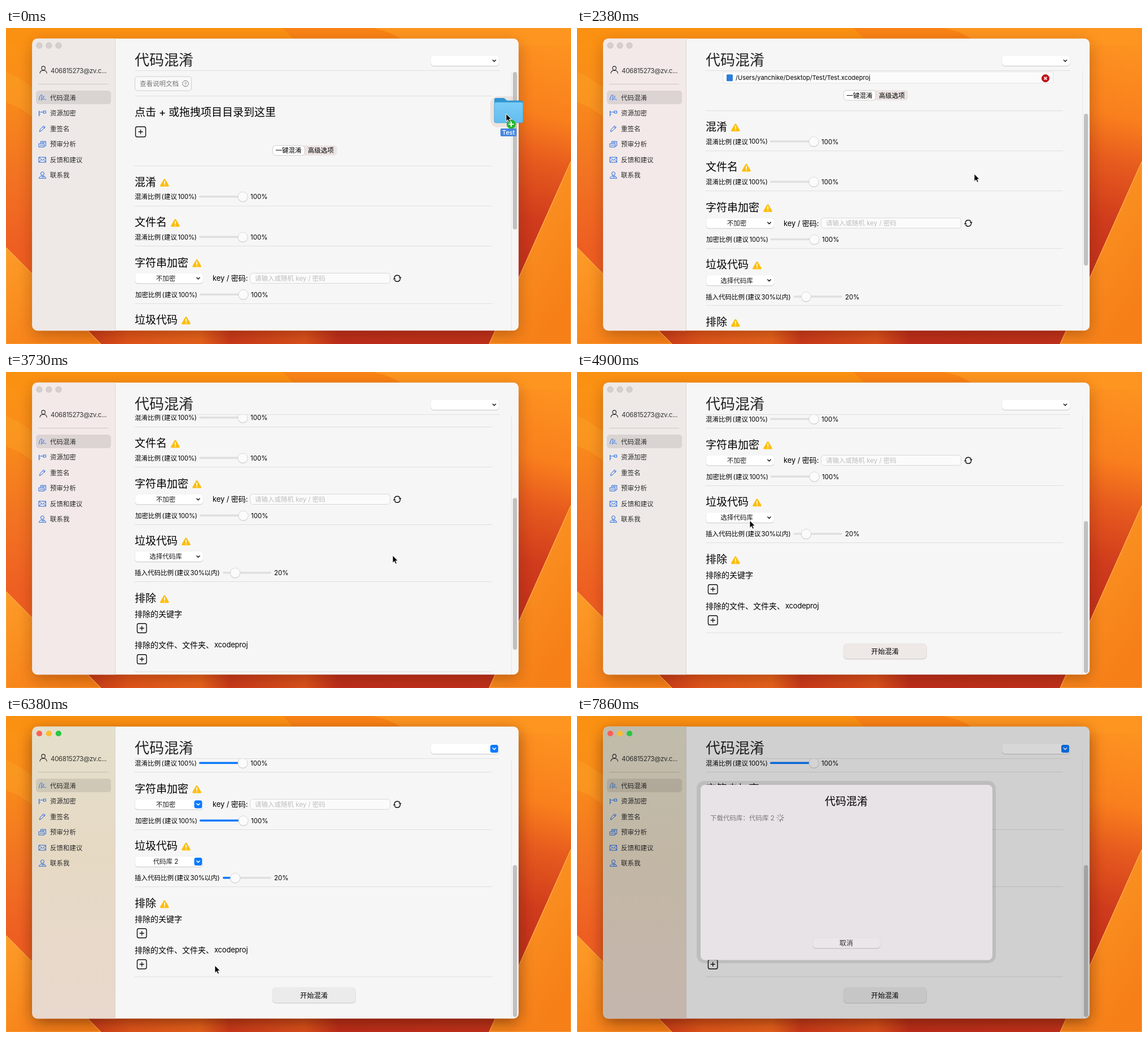
These frames come from a looping animation (1001x560 px, 8 s). An HTML page:

```html
<!DOCTYPE html>
<html lang="zh-CN">
<head>
<meta charset="utf-8">
<style>
html, body { margin: 0; width: 100%; height: 100%; overflow: hidden; background: #f5861c; }
svg { display: block; width: 1001px; height: 560px; }
text { font-family: Inter, "Noto Sans CJK SC", "Noto Sans CJK", sans-serif; white-space: pre; }
.line { stroke: #e0dfdf; }
.icon { fill: none; stroke: #2468e0; stroke-width: 1; stroke-linejoin: round; stroke-linecap: round; }
.accent { display: none; }
.active .accent { display: inline; }
.active .plain { display: none; }
</style>
</head>
<body>
<svg id="stage" viewBox="0 0 1001 560"></svg>
<script>
const stage = document.getElementById('stage');
const BLUE = '#0a7aff';

// ---- drawing helpers ----
const text = (x, cy, size, str, o = '') =>
  `<text x="${x}" y="${cy + size * 0.38}" font-size="${size}" ${o}>${str}</text>`;
const mid = (x, cy, size, str, o = '') => text(x, cy, size, str, 'text-anchor="middle" ' + o);
const rect = (x, y, w, h, r, fill, o = '') =>
  `<rect x="${x}" y="${y}" width="${w}" height="${h}" rx="${r}" fill="${fill}" ${o}/>`;
const path = (d, o) => `<path d="${d}" ${o}/>`;
const line = (y, x1 = 228, x2 = 861) => path(`M${x1} ${y}H${x2}`, 'class="line"');
const group = (id, body, o = '') => `<g id="${id}" ${o}>${body}</g>`;
const chevron = (x, y, color) =>
  path(`M${x - 2.7} ${y - 1.3}l2.7 2.7 2.7 -2.7`, `fill="none" stroke="${color}" stroke-width="1.5" stroke-linecap="round" stroke-linejoin="round"`);

const raised = (x, y, w, h, r, fill, o = '') =>
  rect(x, y + 1, w, h, r, '#000', 'opacity=".16"') + rect(x - .4, y - .3, w + .8, h + .8, r, '#000', 'opacity=".08"') +
  rect(x, y, w, h, r, fill, o);

const popup = (x, cy, label, id = '') =>
  raised(x, cy - 9, 120.5, 18, 5, '#fff') +
  (label ? mid(x + 54.5, cy, 11.5, label, `id="${id}" fill="#1c1c1c"`) : '') +
  `<g class="plain">${chevron(x + 112, cy, '#222')}</g>` +
  `<g class="accent">${rect(x + 105, cy - 7, 14, 14, 3.5, BLUE)}${chevron(x + 112, cy, '#fff')}</g>`;

const slider = (x, cy, knob, value) =>
  rect(x, cy - 2, 86, 3.6, 1.8, '#dfdfdf') + rect(x, cy - 2, knob, 3.6, 1.8, BLUE, 'class="accent"') +
  `<circle cx="${x + knob}" cy="${cy + .6}" r="9" opacity=".15"/>` +
  `<circle cx="${x + knob}" cy="${cy}" r="8.6" fill="#fbfbfb" stroke="#cfcfcf" stroke-width=".7"/>` +
  text(x + 91, cy, 11.5, value);

const ratio = (cy, name, dx = 0) =>
  text(228 + dx, cy, 11.5, name) + text(275.6 + dx, cy, 11.5, '(') + text(280 + dx, cy, 11.5, '建议') +
  text(304.5 + dx, cy, 11.3, '100%)', 'letter-spacing="-.15"') + slider(342 + dx, cy, 77.5, '100%');

const heading = (cy, name) => {
  const x = 242.6 + 19.1 * name.length, y = cy + 1.5;
  return text(228, cy, 19, name) +
    path(`M${x} ${y - 5.5}L${x + 6.3} ${y + 5.3}H${x - 6.3}Z`, 'fill="#fdbe0c" stroke="#fdbe0c" stroke-width="3" stroke-linejoin="round"') +
    path(`M${x} ${y - 2.6}v4.2m0 2.6v.2`, 'stroke="#fff" stroke-width="1.7" stroke-linecap="round"');
};

const plusBox = (x, y, s = 16.5) =>
  rect(x - s / 2, y - s / 2, s, s, 3, 'none', 'stroke="#111" stroke-width="1.4"') +
  path(`M${x - 4} ${y}h8m-4 -4v8`, 'stroke="#111" stroke-width="1.3"');

// ---- scene parts ----
const gradient = (id, attrs, ...stops) =>
  `<linearGradient id="${id}" ${attrs}>${stops.map(([at, c]) => `<stop offset="${at}" stop-color="${c}"/>`).join('')}</linearGradient>`;
const DOWN = 'x2="0" y2="1"';

const defs = `<defs>
  ${gradient('left', DOWN, [0, '#fb9412'], [.2, '#f98c1a'], [.45, '#f27422'], [.7, '#ee5e22'])}
  ${gradient('right', 'gradientUnits="userSpaceOnUse" x1="1001" y1="40" x2="900" y2="440"', [0, '#fd9220'], [.3, '#f97f1d'], [.5, '#e65a1e'], [.75, '#cf3b1c'], [1, '#c2301b'])}
  ${gradient('low', '', [0, '#c93a19'], [.1, '#e2561b'], [.27, '#e8641c'], [.34, '#cb3a1b'], [.52, '#dc521c'], [.6, '#bf2e1b'], [1, '#c2321b'])}
  ${gradient('corner', 'x2=".6" y2="1"', [0, '#fd9c28'], [1, '#f67f18'])}
  ${gradient('warm', DOWN, [0, '#e4dfcb'], [.45, '#e6d9c4'], [1, '#e9d8cd'])}
  ${gradient('blue', DOWN, [0, '#7accf7'], [1, '#62bdee'])}
  <filter id="blur" x="-20%" y="-20%" width="140%" height="150%"><feGaussianBlur stdDeviation="13"/></filter>
  <clipPath id="window"><rect x="46.4" y="18.8" width="861.8" height="517.4" rx="9"/></clipPath>
  <clipPath id="view"><rect x="194" y="76" width="714" height="460"/></clipPath>
</defs>`;

const wallpaper =
  rect(0, 0, 700, 560, 0, 'url(#left)') + rect(480, 0, 521, 560, 0, 'url(#right)') +
  rect(0, 0, 960, 30, 0, '#fb9112') +
  path('M490 0H650Q690 8 712 30H520Z', 'fill="#f98316"') + path('M650 0Q690 8 712 30H1001V0Z', 'fill="#fd9520"') +
  path('M0 78Q28 88 60 118V170Q30 140 0 132Z', 'fill="#fba62a" opacity=".4"') +
  rect(145, 530, 740, 30, 0, 'url(#low)') +
  path('M0 389L168 560H0Z', 'fill="url(#corner)" stroke="#fdb045" stroke-width="1.2"') +
  path('M1001 236L856 560H1001Z', 'fill="url(#corner)" stroke="#fdaa45" stroke-width="1.4"');

const sideIcons = [
  'M-6 4Q-5 -4 -2 -5T-2 2Q-3 6 0 3L3 -3M2 3q2 -2 3 0l1 1',
  'M-6 -4v9M-6 -2H2M2 -4h4v4h-4zM-6 2h2',
  'M-5 5l1 -4 6 -6 3 2 -6 6zM1 -3l3 2',
  'M-3 -2v-3H6V3H4M-6 -1H3V5H-6zM-4 2h5M-1 -3h5',
  'M-6 -4.5H6V4.5H-6zM-6 -4L0 1 6 -4M-6 4l4 -4M6 4L2 0',
  'M-3 -3a3 3 0 1 1 6 0a3 3 0 1 1 -6 0M-6 5Q-5 1 0 1T6 5ZM-1 3h4'
];
const sideNames = ['代码混淆', '资源加密', '重签名', '预审分析', '反馈和建议', '联系我'];

const sidebar =
  rect(46, 18, 147, 519, 0, '#eee9e7', 'id="side"') + path('M193.5 18V537', 'stroke="#dcd6d4"') +
  rect(53, 111, 133, 24, 5, '#000', 'opacity=".09"') +
  path('M63 71.3a3.2 3.4 0 1 1 6.4 0a3.2 3.4 0 1 1 -6.4 0M60 80.5Q60.5 75.5 65 75.5h2.5Q72 75.5 72.3 80.5', 'fill="none" stroke="#222" stroke-width="1.1"') +
  text(79, 75.5, 11.5, '406815273@zv.c...', 'fill="#333" letter-spacing="-.3"') +
  path('M57 99.5H181', 'stroke="#000" opacity=".14"') +
  sideNames.map((name, i) => {
    const y = 123.5 + 27.5 * i;
    return path(sideIcons[i], `class="icon" transform="translate(64.5 ${y})"`) + text(78, y, 11.5, name, 'fill="#2b2b2b"');
  }).join('');

const lights = ['#fe5f57', '#febc2e', '#28c840'].map((c, i) => {
  const at = `cx="${59 + 17 * i}" cy="31" r="5.1"`;
  return `<circle ${at} class="plain" fill="#d6cfcd" stroke="#c2bbb9" stroke-width=".8"/><circle ${at} class="accent" fill="${c}"/>`;
}).join('');

const header = text(228, 56, 26, '代码混淆', 'fill="#222"') + popup(753, 58) + line(75.5, 228, 874);

const folder = (x, y, w, h) =>
  path(`M${x} ${y + h * .1}q0 ${-h * .1} ${w * .06} ${-h * .1}h${w * .28}l${w * .1} ${h * .1}h${w * .5}q${w * .06} 0 ${w * .06} ${h * .1}v${h * .3}h${-w}z`, 'fill="#2f97d2"') +
  rect(x, y + h * .17, w, h * .83, h * .07, 'url(#blue)', 'stroke="#3e9fd6" stroke-width=".7"');

const upper =
  rect(228.5, 86, 100, 25, 4, '#f9f9f9', 'stroke="#d2d0d0"') + text(237, 98.5, 11.5, '查看说明文档', 'fill="#777"') +
  '<circle cx="318" cy="98.5" r="5.3" fill="none" stroke="#777"/>' + mid(318, 98.5, 8, '?', 'fill="#666"') +
  line(120.5) + text(228, 149, 19, '点击') + mid(277, 149, 19, '+') + text(288, 149, 19, '或拖拽项目目录到这里') + plusBox(238.5, 184, 18);

const project =
  folder(259, 177, 16, 14) + text(280, 183.5, 12.5, '/Users/yanchike/Desktop/Test', 'letter-spacing="-.08"') +
  rect(258.5, 201.5, 585, 20, 0, '#fbfbfb', 'stroke="#e4e4e4"') + rect(265, 206, 11, 12, 1.5, '#2b7fd8') +
  text(281, 212, 11, '/Users/yanchike/Desktop/Test/Test.xcodeproj') +
  '<circle cx="830" cy="213" r="6.6" fill="#cb1018" stroke="#8f0a10" stroke-width=".8"/>' +
  path('M827.6 210.6l4.8 4.8m0 -4.8l-4.8 4.8', 'stroke="#fff" stroke-width="1.7"');

const refresh =
  path('M688 442.5a5.4 5.4 0 0 1 10 -1.5M698.4 445a5.4 5.4 0 0 1 -10 1.5', 'fill="none" stroke="#111" stroke-width="1.5"') +
  path('M695.6 441.6h5l-2 3.4zM690.8 445.6h-5l2 -3.4z', 'fill="#111"');

const lower =
  rect(472, 208, 114.5, 18, 5, '#ece5e3') + rect(472.6, 208.3, 56.5, 17.4, 5, '#fff', 'stroke="#c9c4c2" stroke-width=".8"') +
  mid(500.5, 217, 11.5, '一键混淆') + mid(557.8, 217, 11.5, '高级选项') + line(244.5) +
  heading(272.8, '混淆') + ratio(299, '混淆比例') + line(315.5) +
  heading(344, '文件名') + ratio(370.5, '混淆比例') + line(386.5) +
  heading(415.5, '字符串加密') + popup(228.5, 443.5, '不加密') + text(366, 443.5, 13, 'key / 密码:', 'letter-spacing="-.1"') +
  rect(432.5, 434.5, 248, 18, 5, '#fbfbfb', 'stroke="#d9d8d8"') + text(441, 443.7, 11.5, '请输入或随机 key / 密码', 'fill="#bdbdbd"') + refresh +
  ratio(472.5, '加密比例', 1) + line(488.5) +
  heading(517, '垃圾代码') + popup(228.5, 545, '选择代码库', 'library') +
  text(228, 574, 11.5, '插入代码比例') + text(298.2, 574, 11.5, '(') + text(302.6, 574, 11.5, '建议') + text(326.5, 574, 11.5, '30%') +
  text(351.5, 574, 11.5, '以内)') + slider(384, 574, 22, '20%') + line(589.5) +
  heading(619, '排除') + text(228, 646.5, 14, '排除的关键字') + plusBox(240.7, 672) +
  text(228, 701.5, 14, '排除的文件、文件夹、') + text(369, 701.5, 13, 'xcodeproj', 'letter-spacing="-.2"') + plusBox(240.7, 727) +
  line(749) + raised(472, 768, 147.5, 27.5, 7, '#eee8e6', 'id="start"') + mid(545.5, 782, 12.3, '开始混淆');

const spokes = [...Array(8)].map((_, i) => path('M0 -3.2V-6.4', `stroke="#555" stroke-width="1.5" stroke-linecap="round" opacity="${.25 + i * .09}" transform="rotate(${i * 45})"`)).join('');

const sheet =
  rect(212, 115, 530, 323, 14, '#000', 'opacity=".09"') + rect(219, 122, 517, 310.5, 8, '#e8e3e6') +
  mid(477, 151, 19, '代码混淆') + text(236, 180.3, 11.5, '下载代码库：代码库 2', 'fill="#7b7779"') +
  group('spin', spokes) + raised(418, 393, 119, 18.5, 5, '#ebe6e9') + mid(477, 402.5, 12, '取消', 'fill="#333"');

const menuItems = ['选择代码库', '代码库 1', '代码库 2'];
const menu =
  rect(227, 250, 127, 64, 6, '#000', 'opacity=".15"') + rect(227.5, 249, 126, 63.5, 6, '#f1ece8', 'stroke="#c9c4c0" stroke-width=".7"') +
  rect(233, 271.5, 115, 19, 4, BLUE, 'id="hot"') +
  menuItems.map((s, i) => text(253.5, 262 + 19 * i, 11.5, s, `id="item${i}"`)).join('');

const dragged =
  rect(-28, -31, 50, 55, 14, '#c9a797', 'opacity=".25"') + folder(-21, -28, 51, 44) +
  rect(-10, 26, 28.5, 14, 2, '#4887e2') + mid(4.3, 33, 11, 'Test', 'fill="#fff" font-weight="500"') +
  '<circle cx="9" cy="18.5" r="8" fill="#27b52f"/>' + path('M4.5 18.5h9m-4.5 -4.5v9', 'stroke="#fff" stroke-width="2"');

const pointer = path('M0 0V13.4L3.1 10.6 5.2 15.2 7.5 14.1 5.4 9.7H9.5Z', 'fill="#000" stroke="#fff" stroke-width="1" stroke-linejoin="round"');

stage.innerHTML = defs + wallpaper +
  rect(47, 27, 861, 517, 12, '#4a1500', 'id="shadow" filter="url(#blur)"') +
  group('app', rect(46, 18, 863, 519, 0, '#f6f6f6') + sidebar + header +
    `<g clip-path="url(#view)">${group('scroll', upper + group('project', project) + group('lower', lower))}</g>` +
    path('M895.5 76V536', 'stroke="#e6e6e6"') + rect(898, 78, 7.5, 279, 3.7, '#c1c1c1', 'id="thumb"') +
    rect(46, 18, 863, 519, 0, '#000', 'id="dim"') + lights, 'clip-path="url(#window)"') +
  group('menu', menu) + group('sheet', sheet) + group('drag', dragged) + group('cursor', pointer);

// ---- timing ----
const el = id => document.getElementById(id);
const set = (id, attrs) => { for (const k in attrs) el(id).setAttribute(k, attrs[k]); };
const show = (id, on) => { el(id).style.display = on ? '' : 'none'; };

const shortTicks = [3, 7, 25, 28, 31, 38, 42, 46, 51, 53];
function tickAt(ms) {
  let k = 0, end = 0;
  for (; k < 53; k++) {
    end += shortTicks.includes(k) ? 140 : 150;
    if (ms < end) break;
  }
  return k;
}

function track(keys, k) {
  if (k <= keys[0][0]) return keys[0].slice(1);
  for (let i = 1; i < keys.length; i++) {
    const [a, b] = [keys[i - 1], keys[i]];
    if (k <= b[0]) {
      const p = (k - a[0]) / (b[0] - a[0]);
      return a.slice(1).map((v, j) => v + (b[j + 1] - v) * p);
    }
  }
  return keys[keys.length - 1].slice(1);
}

const pointerKeys = [[0, 886, 152], [8, 706, 181], [9, 714, 187], [10, 714, 187], [20, 697, 306], [25, 685, 325], [28, 655, 320],
  [32, 316, 266], [33, 306, 263], [35, 306, 263], [36, 307, 270], [38, 312, 291], [40, 313, 293], [41, 318, 304],
  [43, 370, 442], [46, 520, 488], [48, 541, 494]];
const scrollKeys = [[10, 26], [20, 189], [25, 244], [29, 313]];
const dimKeys = [[48, 0], [51, .155]];

function draw(k) {
  const dropped = k >= 9, active = k >= 34, open = k >= 34 && k < 41, sheetOn = k >= 49;
  const scroll = dropped ? track(scrollKeys, k)[0] : 0;
  const [x, y] = track(pointerKeys, k);

  el('app').classList.toggle('active', active);
  set('side', { fill: active ? 'url(#warm)' : dropped && k < 33 ? '#f2e9e8' : '#eee9e7' });
  set('shadow', { opacity: active ? .55 : .32 });
  set('scroll', { transform: `translate(0 ${-scroll})` });
  set('lower', { transform: `translate(0 ${dropped ? 26 : 0})` });
  show('project', dropped);
  set('thumb', { y: dropped ? 94 + (scroll - 26) * .593 : 78, height: dropped ? 269 : 279 });
  set('start', { fill: k === 48 ? '#d6d6d6' : active ? '#ebebeb' : '#eee8e6' });
  el('library').textContent = menuItems[k >= 41 ? 2 : 0];

  show('menu', open);
  const hot = k < 36 ? 0 : k < 38 ? 1 : 2;
  show('hot', hot > 0);
  set('hot', { y: 252.5 + 19 * hot });
  menuItems.forEach((_, i) => set('item' + i, { fill: i === 0 ? '#8c8885' : i === hot ? '#fff' : '#222' }));

  set('dim', { opacity: track(dimKeys, k)[0] });
  show('sheet', sheetOn);
  const grow = Math.min(1, .9 + (k - 48) * .05);
  set('sheet', { opacity: k === 49 ? .6 : 1, transform: `translate(477.5 277) scale(${grow}) translate(-477.5 -277)` });
  set('spin', { transform: `translate(360 180.3) rotate(${k * 45})` });

  set('drag', { transform: `translate(${x} ${y})` });
  show('drag', !dropped);
  set('cursor', { transform: `translate(${x} ${y})` });
  show('cursor', !sheetOn);
}

const began = performance.now();
function loop() {
  draw(tickAt((performance.now() - began) % 8000));
  requestAnimationFrame(loop);
}
draw(0);
requestAnimationFrame(loop);
</script>
</body>
</html>
```
